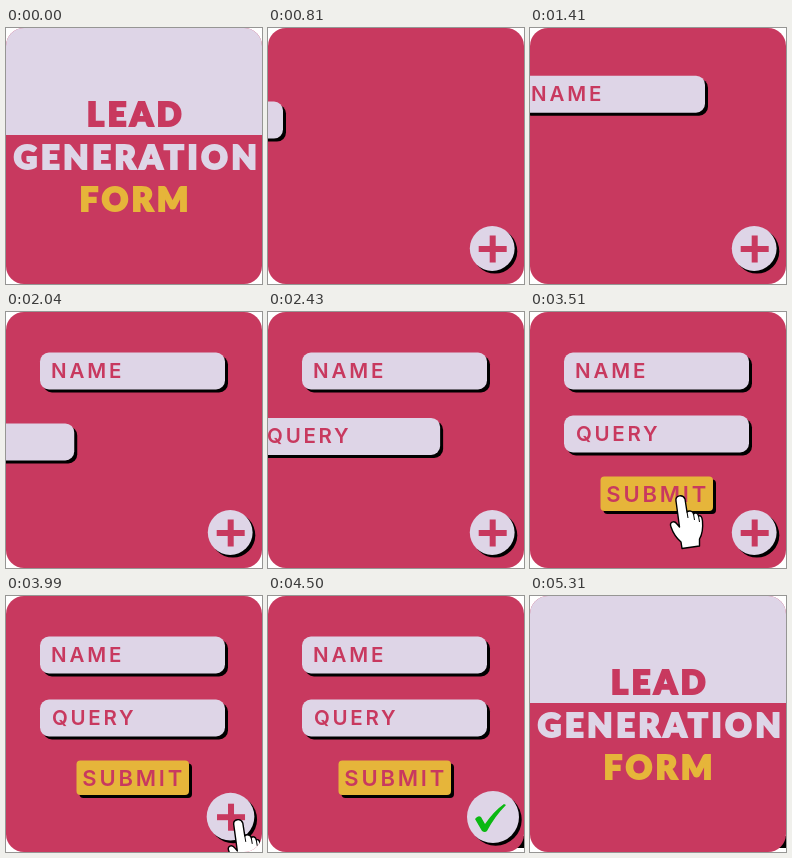
An HTML page with a canvas that plays this animation: 256 px wide and 256 px high, repeating every 6.21 s.

```html
<!DOCTYPE html>
<html lang="en">
<head>
<meta charset="utf-8">
<title>Lead generation form</title>
<style>
html, body { margin: 0; width: 100%; height: 100%; overflow: hidden; background: #fff; }
canvas { display: block; width: 100vw; height: 100vh; }
</style>
</head>
<body>
<canvas id="stage" width="256" height="256"></canvas>
<script>
const ctx = document.getElementById('stage').getContext('2d');
const LOOP = 6210, STEP = 30;
const PINK = '#c8395f', LILAC = '#ded5e7', GOLD = '#e6b53a', GREEN = '#0bb812', BLACK = '#000';
const HEAD = '900 32.5px Lato, "Open Sans", sans-serif';
const LABEL = '600 20.5px Inter, Roboto, sans-serif';
const ACTION = '600 22px Inter, Roboto, sans-serif';

const clamp = v => Math.max(0, Math.min(1, v));
const progress = (t, from, to) => clamp((t - from) / (to - from));
const mix = (a, b, p) => a + (b - a) * p;

// Position along timed points [time, x, y].
function along(points, t) {
  let i = 0;
  while (i < points.length - 2 && t > points[i + 1][0]) i++;
  const [a, b] = [points[i], points[i + 1]];
  const p = progress(t, a[0], b[0]);
  return [mix(a[1], b[1], p), mix(a[2], b[2], p)];
}

function box(x, y, w, h, r, color) {
  ctx.fillStyle = color;
  ctx.beginPath();
  ctx.roundRect(x, y, w, h, r);
  ctx.fill();
}

function disc(x, y, r, color) {
  ctx.fillStyle = color;
  ctx.beginPath();
  ctx.arc(x, y, r, 0, Math.PI * 2);
  ctx.fill();
}

function write(text, x, y, font, color, spacing) {
  ctx.font = font;
  ctx.letterSpacing = spacing + 'px';
  ctx.textAlign = 'left';
  ctx.fillStyle = color;
  ctx.fillText(text, x, y);
}

// Centred heading, thickened by an outline.
function heading(text, x, y, color) {
  ctx.font = HEAD;
  ctx.letterSpacing = '3.7px';
  ctx.textAlign = 'center';
  ctx.fillStyle = ctx.strokeStyle = color;
  ctx.lineWidth = 2;
  ctx.lineJoin = 'miter';
  ctx.miterLimit = 3;
  ctx.fillText(text, x, y);
  ctx.strokeText(text, x, y);
}

// Each part slides in from the left and settles at its own place.
const parts = [
  { text: 'NAME', x: 34, y: 40.5, w: 185, h: 37, r: 9, tx: 11, ty: 25.3, font: LABEL, gap: 2.9,
    fill: LILAC, start: 720, end: 1575, dx: -228, dy: 37 },
  { text: 'QUERY', x: 34, y: 103.5, w: 185, h: 37, r: 9, tx: 12, ty: 25.3, font: LABEL, gap: 2.7,
    fill: LILAC, start: 1750, end: 2606, dx: -228, dy: 12 },
  { text: 'SUBMIT', x: 70.5, y: 164.5, w: 112.5, h: 34.5, r: 4, tx: 5.8, ty: 25.2, font: ACTION, gap: 2.8,
    fill: GOLD, start: 2670, end: 3378, dx: -189, dy: 7 }
];

function drawPart(part, t) {
  if (t < part.start) return;
  const rest = 1 - progress(t, part.start, part.end);
  const x = part.x + part.dx * rest, y = part.y + part.dy * rest;
  box(x + 3, y + 3, part.w, part.h, part.r, BLACK);
  box(x, y, part.w, part.h, part.r, part.fill);
  write(part.text, x + part.tx, y + part.ty, part.font, PINK, part.gap);
}

function drawPlus(x, y, size) {
  ctx.fillStyle = PINK;
  ctx.fillRect(x - 14 * size, y - 3 * size, 28 * size, 6 * size);
  ctx.fillRect(x - 3 * size, y - 13.5 * size, 6 * size, 27 * size);
}

function drawCheck(p) {
  ctx.save();
  ctx.beginPath();
  ctx.rect(205, 205, 35 * p, 34);
  ctx.clip();
  ctx.fillStyle = GREEN;
  ctx.beginPath();
  ctx.moveTo(207, 223);
  ctx.quadraticCurveTo(210, 219, 213, 221);
  ctx.lineTo(217, 228);
  ctx.quadraticCurveTo(226, 215, 236, 208);
  ctx.lineTo(238, 209);
  ctx.quadraticCurveTo(227, 220, 219, 235);
  ctx.quadraticCurveTo(217, 237, 214, 235);
  ctx.closePath();
  ctx.fill();
  ctx.restore();
}

function drawButton(t) {
  const grow = progress(t, 3870, 4170);
  const x = mix(224.2, 225, grow), y = mix(220.5, 221, grow), r = mix(22.4, 26, grow);
  disc(x + 2.7, y + 2.7, r, BLACK);
  disc(x, y, r, LILAC);
  const size = 1 - progress(t, 4020, 4200);
  if (size > 0) drawPlus(x + .5, y + .5, size);
  drawCheck(progress(t, 4170, 4500));
}

const handPath = [
  [2670, -71, 179], [2880, -15, 181], [3510, 151, 184],
  [3795, 225, 213], [3930, 225, 213], [4200, 260, 262]
];

function drawHand(t) {
  if (t < 2670 || t >= 4200) return;
  const [x, y] = along(handPath, t);
  ctx.save();
  ctx.translate(x, y);
  ctx.beginPath();
  ctx.moveTo(-5, 5);
  ctx.bezierCurveTo(-6, -1, 2, -2, 4, 3);
  ctx.lineTo(6, 16);
  ctx.bezierCurveTo(8, 14, 12, 15, 12.5, 18);
  ctx.bezierCurveTo(14, 16, 17, 17, 17.5, 20);
  ctx.bezierCurveTo(20, 19, 21, 21, 21.5, 25);
  ctx.quadraticCurveTo(22.5, 36, 18.5, 43);
  ctx.lineTo(18.5, 50);
  ctx.lineTo(1, 52.5);
  ctx.lineTo(0, 46);
  ctx.quadraticCurveTo(-7, 40, -10, 31);
  ctx.bezierCurveTo(-12, 26, -7, 24, -4, 28);
  ctx.lineTo(-1.5, 31);
  ctx.closePath();
  ctx.fillStyle = '#fff';
  ctx.fill();
  ctx.strokeStyle = BLACK;
  ctx.lineWidth = 1.4;
  ctx.lineJoin = 'round';
  ctx.stroke();
  ctx.beginPath();
  for (const [kx, ky] of [[6, 16], [12.5, 18], [17.5, 20]]) {
    ctx.moveTo(kx, ky);
    ctx.lineTo(kx + 1, ky + 6);
  }
  ctx.lineWidth = 1;
  ctx.stroke();
  ctx.restore();
}

function drawForm(t) {
  ctx.fillStyle = PINK;
  ctx.fillRect(0, 0, 256, 256);
  for (const part of parts) drawPart(part, t);
  drawButton(t);
  drawHand(t);
}

function drawTitle() {
  ctx.fillStyle = PINK;
  ctx.fillRect(0, 0, 256, 256);
  ctx.fillStyle = LILAC;
  ctx.fillRect(0, 0, 256, 107);
  heading('LEAD', 130.1, 98.2, PINK);
  heading('GENERATION', 131.1, 140.6, LILAC);
  heading('FORM', 129.8, 183, GOLD);
}

function drawScene(t) {
  ctx.fillStyle = '#fff';
  ctx.fillRect(0, 0, 256, 256);
  if (t >= 4140) {
    ctx.fillStyle = BLACK;
    ctx.fillRect(247, 240, 9, 12);
  }
  ctx.save();
  ctx.beginPath();
  ctx.roundRect(0, 0, 256, 256, 18);
  ctx.clip();
  if (t < 720) {
    drawTitle();
  } else {
    if (t < 5310) drawForm(t);
    ctx.globalAlpha = progress(t, 4800, 5310);
    if (ctx.globalAlpha === 1) drawTitle();
    else if (ctx.globalAlpha > 0) fadeTitle();
  }
  ctx.restore();
}

// The title is fully opaque on its own layer, so it fades as one picture.
const layer = new OffscreenCanvas(256, 256);
function fadeTitle() {
  ctx.drawImage(layer, 0, 0);
}

let begin;
function tick(now) {
  begin ??= now;
  const t = (now - begin) % LOOP;
  drawScene(Math.floor(t / STEP + .01) * STEP);
  requestAnimationFrame(tick);
}
drawScene(0);
layer.getContext('2d').drawImage(ctx.canvas, 0, 0);
requestAnimationFrame(tick);
</script>
</body>
</html>
```
